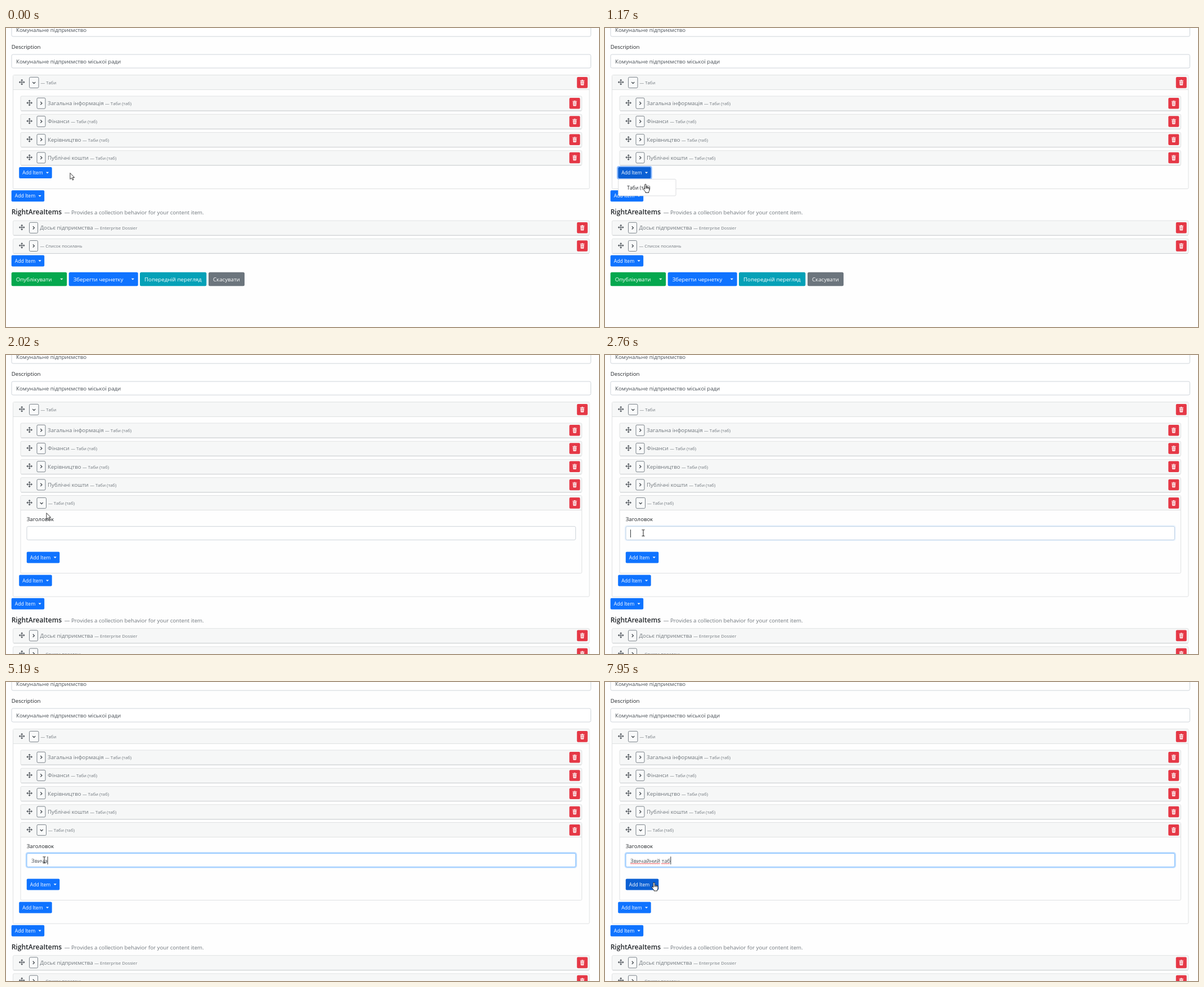
An HTML page that plays this animation: 1054 px wide and 531 px high, repeating every 8 s.

```html
<!DOCTYPE html>
<html lang="uk">
<head>
<meta charset="utf-8">
<title>Content editor</title>
<style>
  html, body { margin: 0; width: 100%; height: 100%; overflow: hidden; background: #fefefe; }
  svg { display: block; width: 100%; height: 100%; }
  text { font: 9.7px "Open Sans", "Noto Sans", sans-serif; fill: #212529; white-space: pre; }
  .value { fill: #495057; }
  .head { fill: #6f767c; }
  .small { font-size: 7.75px; fill: #737a80; }
  .btn { font-size: 8.6px; fill: #fff; }
  .big { fill: #fff; }
  .title { font-size: 12px; font-weight: 600; }
  .item { font-size: 8.6px; }
</style>
</head>
<body>
<svg id="stage" viewBox="0 0 1054 531" preserveAspectRatio="none"></svg>
<script>
const LOOP = 8000, SHIFT = 143.6;
const BLUE = [15, 115, 255], DARK = [11, 96, 212];
const GREY = [206, 212, 218], GLOW = [128, 189, 255];

const rect = (x, y, w, h, fill, more = '') =>
  `<rect x="${x}" y="${y}" width="${w}" height="${h}" fill="${fill}" ${more}/>`;
const text = (x, y, cls, s, more = '') => `<text x="${x}" y="${y}" class="${cls}" ${more}>${s}</text>`;
const caret = (x, y) => `<path d="M${x - 2.6} ${y - 1.2}h5.2l-2.6 2.7z" fill="#fff"/>`;
const small = s => `<tspan class="small">${s}</tspan>`;

const input = (x, y, w, s, id = '') =>
  rect(x, y, w, 24, '#fff', `rx="2.5" stroke="#ced4da" ${id && `id="${id}"`}`) + text(x + 8, y + 16, 'value', s);

const addButton = (x, y, id = '') =>
  rect(x, y, 58.5, 20, `rgb(${BLUE})`, `rx="2" ${id && `id="${id}"`}`) +
  text(x + 6, y + 13.2, 'btn', 'Add Item') + caret(x + 50.4, y + 10);

const bigButton = (x, w, fill, s, split) =>
  rect(x, 433.7, w, 24.5, fill, 'rx="2.5"') + text(x + 8, 449.8, 'big', s) +
  (split ? caret(x + w - 9.4, 446) : '');

function moveIcon(x, y) {
  const arm = [0, 90, 180, 270].map(a =>
    `<path d="M0 0V-3.6" stroke="#50565c" stroke-width="1.1"/><path d="M0-5.4L2.2-2.9H-2.2z" fill="#50565c"/>`
      .replace(/<path/g, `<path transform="rotate(${a})"`)).join('');
  return `<g transform="translate(${x} ${y})">${arm}</g>`;
}

function toggle(x, y, open) {
  const w = open ? 16.5 : 15, cx = x + w / 2;
  const mark = open ? `M${cx - 2.5} ${y - 1}l2.5 2.5 2.5-2.5` : `M${cx - 1.2} ${y - 2.6}l2.6 2.6-2.6 2.6`;
  return rect(x, y - 9.5, w, 19, '#f9fafa', 'rx="2" stroke="#6c757d" stroke-width=".9"') +
    `<path d="${mark}" fill="none" stroke="#4c5258" stroke-width="1.4"/>`;
}

const trash = (x, y) => rect(x, y - 9.8, 19, 19.6, '#e53846', 'rx="2"') +
  `<g transform="translate(${x + 9.5} ${y})"><path d="M-3.8-3.9h2.3l.6-.9h1.8l.6.9h2.3v1h-7.6z
  M-3.2-2.2h6.4l-.4 6.1q-.1.9-1 .9h-3.6q-.9 0-1-.9z" fill="#fff"/>
  <path d="M-1.5-1v4.4M0-1v4.4M1.5-1v4.4" stroke="#e53846" stroke-width=".6"/></g>`;

// Header controls shared by open cards and closed rows.
const controls = (x, right, y, open) =>
  moveIcon(x + 15.7, y - .7) + toggle(x + 29, y, open) + trash(right - 22.2, y);

const row = (x, right, y, label) =>
  rect(x, y - 12.7, right - x, 26, '#f6f7f7', 'rx="2" stroke="#e1e3e4"') +
  `<path d="M${x + 1} ${y + 13.5}H${right - 1}" stroke="#cdd0d2"/>` +
  controls(x, right, y) + text(x + 48, y + 3.3, 'head', label);

const card = (x, right, y, h, label, id = '') =>
  rect(x, y, right - x, h, '#fefefe', `rx="2" stroke="#dfe1e2" ${id && `id="${id}"`}`) +
  rect(x + .5, y + .5, right - x - 1, 25.5, '#f6f7f7') +
  `<path d="M${x} ${y + 26}H${right}" stroke="#dfe1e2"/>` +
  controls(x, right, y + 13.4, true) + text(x + 49, y + 16.7, 'small', label);

const zigzag = (a, b) => {
  let d = `M${a} 323.2`;
  for (let x = a, k = 1; x < b; x += 1.5, k = -k) d += `l1.5 ${-1.3 * k}`;
  return d;
};

const tabs = ['Загальна інформація', 'Фінанси', 'Керівництво', 'Публічні кошти'];
const stage = document.getElementById('stage');
stage.innerHTML =
  rect(0, 0, 1054, 531, '#fefefe') +
  input(10, -9, 1029.5, 'Комунальне підприємство') +
  text(9.7, 37.4, '', 'Description') +
  input(10, 47, 1029.5, 'Комунальне підприємство міської ради') +
  card(12.5, 1037, 83.5, 202, '— Таби', 'outer') +
  tabs.map((s, i) => row(26, 1023.5, 133.7 + 32.25 * i, s + ' ' + small('— Таби (таб)'))).join('') +
  `<g id="fresh">` +
    card(26, 1023.5, 249.5, 138, '— Таби (таб)') +
    text(36.7, 295.3, '', 'Заголовок') +
    rect(36, 303.3, 977.5, 26, 'none', 'id="halo" rx="3.2" stroke="#007bff" stroke-opacity=".25" stroke-width="2.6"') +
    input(37, 304.4, 975.5, '', 'field') +
    text(45, 320.5, 'value', '', 'id="typed"') +
    `<path id="wave" d="${zigzag(45, 97)}${zigzag(100, 115)}" fill="none" stroke="#e8303a" stroke-width=".9"/>` +
    rect(45, 310, 1, 14, '#33383d', 'id="bar"') +
    addButton(36.8, 349.4, 'addInner') +
  `</g>
  <g id="lower">` +
    rect(22, 246, 60.7, 22, 'none', 'id="ring" rx="3" stroke="#8fbcff" stroke-width="2"') +
    addButton(23.2, 247, 'addTab') + addButton(9.7, 288.2) +
    text(9.7, 331.2, 'title', 'RightAreaItems') +
    text(103.8, 331.2, 'head', '— Provides a collection behavior for your content item.') +
    row(12.5, 1037, 354.8, 'Досьє підприємства ' + small('— Enterprise Dossier')) +
    row(12.5, 1037, 387, small('— Список посилань')) +
    addButton(9.7, 403.5) +
    bigButton(9.7, 98.5, '#05a84e', 'Опублікувати', true) +
    bigButton(111.7, 123, `rgb(${BLUE})`, 'Зберегти чернетку', true) +
    bigButton(238, 118.3, '#05a1b7', 'Попередній перегляд') +
    bigButton(360, 64, '#6c757d', 'Скасувати') +
  `</g>
  <g id="menu">` +
    rect(23.7, 268.5, 102.3, 29.5, '#fff', 'rx="2" stroke="#d9dbdd" stroke-width=".9"') +
    rect(24.2, 273.2, 101.3, 20, `rgb(${BLUE})`, 'id="picked"') +
    text(39.3, 286.9, 'item', 'Таби (таб)', 'id="choice"') +
  `</g>` +
  rect(-5, 520.5, 244, 20, '#fff', 'id="bubble" rx="2" stroke="#e3e4e5"') +
  `<g id="pointer">
    <path id="arrow" d="M0 0V11L2.6 8.7 4.4 12.6 6.1 11.9 4.4 8H7.7z" fill="#fff" stroke="#222" stroke-width=".9"/>
    <path id="hand" d="M-1.2 8.8V1Q-1.2 0 0 0T1.2 1V5Q2.3 4.3 3.1 5.4 4.2 4.7 5 5.9 7 5.3 7 7.3V10.5
      Q7 12.3 5.8 13.3V15H0V13.5Q-1.8 11.6-3.3 9.4-4.1 8-3 7.5-2.2 7.2-1.2 8.8zM1.2 5V8M3.1 5.6V8M5 6.2V8.3"
      fill="#fff" stroke="#111" stroke-width=".9"/>
    <path id="beam" d="M-2.5-5.5H-.8L0-4.8.8-5.5H2.5M0-4.8V4.8M-2.5 5.5H-.8L0 4.8.8 5.5H2.5"
      fill="none" stroke="#333" stroke-width="1.1"/>
  </g>`;

const el = {};
stage.querySelectorAll('[id]').forEach(n => el[n.id] = n);

const ramp = (t, a, b) => Math.min(1, Math.max(0, (t - a) / (b - a)));
const ease = p => p * p * (3 - 2 * p);
const mix = (a, b, p) => `rgb(${a.map((v, i) => Math.round(v + (b[i] - v) * p))})`;
const show = (n, on) => n.setAttribute('display', on ? 'inline' : 'none');

// Pointer stops: time, x, y.
const path = [
  [0, 114, 257.5], [70, 110, 257.5], [410, 70, 258], [1010, 70, 258], [1180, 72, 278.5],
  [1350, 72, 280.5], [2020, 72, 280.5], [2460, 68, 316], [7270, 68, 316], [7330, 66, 314],
  [7450, 65, 307], [7580, 68, 317], [7790, 83, 349], [7950, 87, 356]
];
function pointerAt(t) {
  let i = path.findIndex(p => p[0] > t);
  if (i < 0) return path[path.length - 1].slice(1);
  const a = path[i - 1], b = path[i], p = ramp(t, a[0], b[0]);
  return [a[1] + (b[1] - a[1]) * p, a[2] + (b[2] - a[2]) * p];
}

const phrase = 'Звичайний таб';
// Time, characters typed by then.
const keys = [[4410, 1], [4600, 2], [4800, 3], [5190, 5], [5400, 6], [5530, 7],
  [5800, 8], [6400, 10], [6530, 12], [6800, 13]];
let shown = -1, width = 0;

function type(t) {
  const n = keys.reduce((k, [at, c]) => t >= at ? c : k, 0);
  if (n === shown) return;
  shown = n;
  el.typed.textContent = phrase.slice(0, n);
  width = n ? el.typed.getComputedTextLength() : 0;
  el.bar.setAttribute('x', 45 + width);
}

function draw(t) {
  const added = t >= 2020;
  show(el.fresh, added);
  el.lower.setAttribute('transform', `translate(0 ${added ? SHIFT : 0})`);
  el.outer.setAttribute('height', 202 + (added ? SHIFT : 0));

  el.addTab.setAttribute('fill', mix(BLUE, DARK, ramp(t, 260, 410) - ramp(t, 1740, 1840)));
  el.ring.setAttribute('opacity', ramp(t, 550, 700) - ramp(t, 1680, 1830));
  show(el.menu, t >= 690 && t < 1760);
  const picked = t >= 1680;
  show(el.picked, picked);
  el.choice.style.fill = picked ? '#fff' : '#212529';
  show(el.bubble, t >= 1840 && t < 2020);

  const focus = ease(ramp(t, 2700, 2880));
  el.field.setAttribute('stroke', mix(GREY, GLOW, focus));
  el.halo.setAttribute('opacity', focus);
  type(t);
  show(el.bar, t >= 2690 && !(t >= 3210 && t < 3740));
  show(el.wave, t >= 7540);
  el.addInner.setAttribute('fill', mix(BLUE, DARK, ramp(t, 7790, 7930)));

  const [x, y] = pointerAt(t);
  let kind = 'arrow';
  if (!added) { if (x < 82 && t < 1760) kind = 'hand'; }
  else if (y >= 349) kind = 'hand';
  else if (y > 304 && y < 329) kind = 'beam';
  el.pointer.setAttribute('transform', `translate(${x} ${y})`);
  for (const k of ['arrow', 'hand', 'beam']) show(el[k], k === kind);
}

const start = performance.now();
function tick() {
  draw((performance.now() - start) % LOOP);
  requestAnimationFrame(tick);
}
tick();
</script>
</body>
</html>
```
